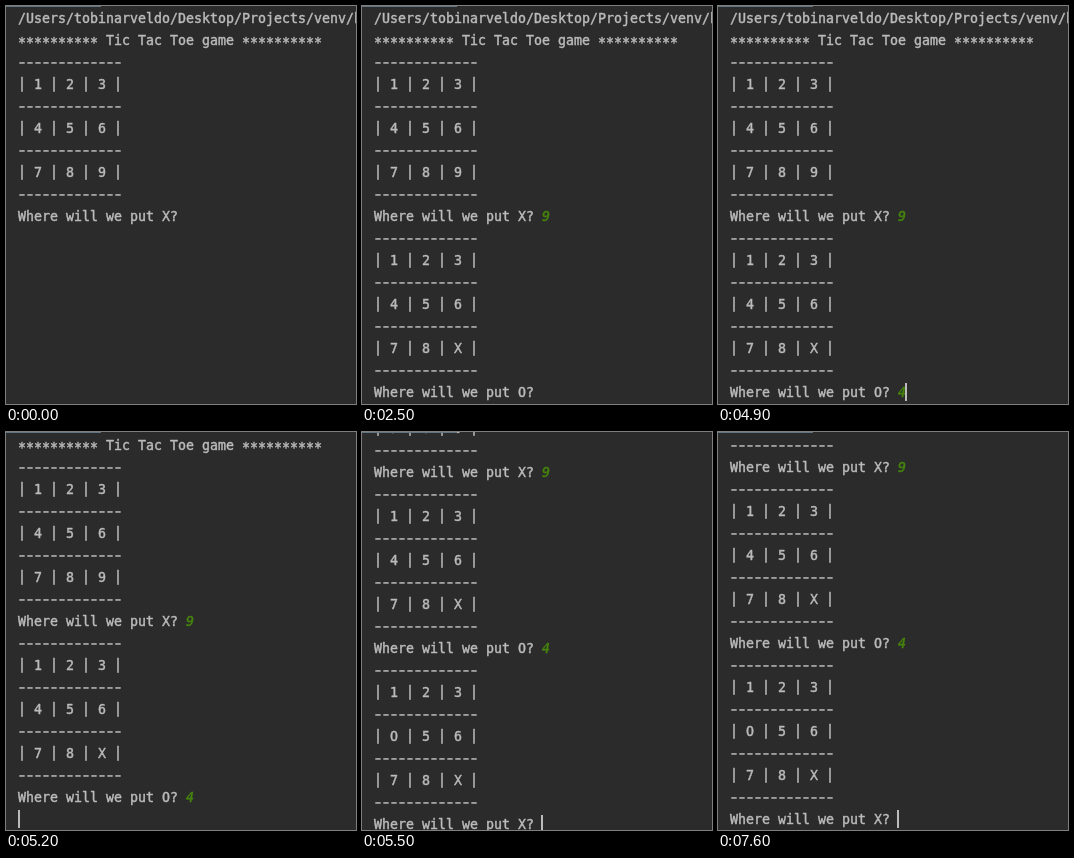
Recreate the animation shown at these times as an HTML page with a canvas. Size 350 by 398 pixels, loop 8 s.

```html
<!DOCTYPE html>
<html lang="en">
<head>
<meta charset="utf-8">
<title>Tic Tac Toe console</title>
<style>
  html, body { margin: 0; width: 100%; height: 100%; overflow: hidden; background: #2b2b2b; }
  canvas { display: block; }
</style>
</head>
<body>
<canvas id="console" width="350" height="398"></canvas>
<script>
const ctx = document.getElementById('console').getContext('2d');
const LOOP = 8000, LEFT = 12, CELL = 8, LINE = 22, FIRST_CENTER = 12;
const FONT = '13.289px "DejaVu Sans Mono", monospace';
const TEXT = '#bbbbbb', INPUT = '#46860c';

// Vertical nudges for glyphs that sit differently in the console font.
const SHIFTS = { '*': 2, '|': -1 };

function board(cells) {
  const rule = '-'.repeat(13);
  const lines = [rule];
  for (let i = 0; i < 9; i += 3) {
    lines.push('| ' + [...cells.slice(i, i + 3)].join(' | ') + ' |', rule);
  }
  return lines;
}

const stars = '*'.repeat(10);
const lines = [
  '/Users/tobinarveldo/Desktop/Projects/venv/bin/python',
  `${stars} Tic Tac Toe game ${stars}`,
  ...board('123456789'), 'Where will we put X? ',
  ...board('12345678X'), 'Where will we put O? ',
  ...board('123O5678X'), 'Where will we put X? '
];

// The second board still shows the 4; the third has the O in its place.
const answers = [
  { time: 1400, line: 9, text: '9' },
  { time: 4900, line: 17, text: '4' }
];

// Each step: start time, line and column of the caret, scroll offset.
const steps = [
  { time: 0, line: 9, col: 21, scroll: 0 },
  { time: 1400, line: 9, col: 22, scroll: 0 },
  { time: 1800, line: 17, col: 21, scroll: 0 },
  { time: 4900, line: 17, col: 22, scroll: 0 },
  { time: 5200, line: 18, col: 0, scroll: 21 },
  { time: 5400, line: 25, col: 21, scroll: 110 },
  { time: 5500, line: 25, col: 21, scroll: 170 },
  { time: 5600, line: 25, col: 21, scroll: 175 }
];

const caretShown = [
  [600, 1000], [1400, 2500], [3000, 3500], [4000, 4500],
  [4900, 6100], [6600, 7100], [7600, LOOP]
];

function write(text, col, center, color, style = '') {
  ctx.font = `${style} ${FONT}`;
  ctx.fillStyle = ctx.strokeStyle = color;
  ctx.lineWidth = 0.45;
  ctx.lineJoin = 'round';
  [...text].forEach((char, i) => {
    const x = LEFT + (col + i) * CELL;
    if (char === '-') {
      ctx.fillRect(x + 1.3, center + 0.2, 5.4, 1.5);
      return;
    }
    const y = center + 5 + (SHIFTS[char] || 0);
    ctx.fillText(char, x, y);
    ctx.strokeText(char, x, y); // medium weight
  });
}

function draw(time) {
  const step = steps.filter(s => s.time <= time).pop();
  const centerOf = line => FIRST_CENTER + line * LINE - step.scroll;
  const lineCount = step.col === 0 ? step.line : step.line + 1;

  ctx.fillStyle = '#2b2b2b';
  ctx.fillRect(0, 0, 350, 398);

  lines.slice(0, lineCount).forEach((text, i) => write(text, 0, centerOf(i), TEXT));
  for (const answer of answers) {
    if (time >= answer.time) write(answer.text, 21, centerOf(answer.line), INPUT, 'italic');
  }

  ctx.fillStyle = '#62747f';
  ctx.fillRect(0, 0, 95, 1);

  if (caretShown.some(([from, to]) => time >= from && time < to)) {
    const x = Math.max(LEFT, LEFT + step.col * CELL - 1);
    ctx.fillStyle = TEXT;
    ctx.fillRect(x, centerOf(step.line) - 9, 2, 18);
  }
}

const start = performance.now();
function frame() {
  draw((performance.now() - start) % LOOP);
  requestAnimationFrame(frame);
}
frame();
</script>
</body>
</html>
```
